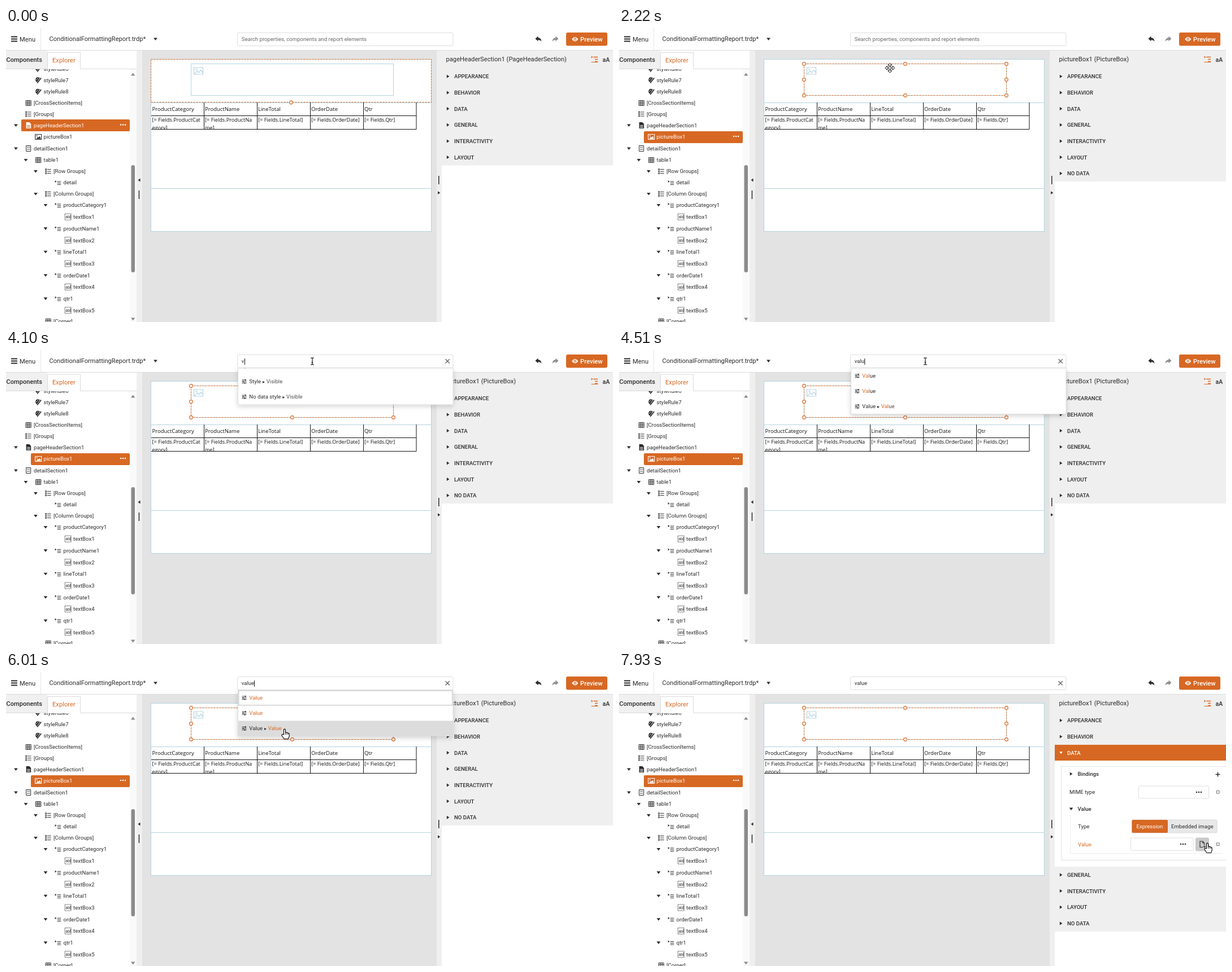
An HTML page for the animation above (8000 ms loop, 1074 by 521 pixels).

```html
<!DOCTYPE html>
<html lang="en">
<head>
<meta charset="utf-8">
<title>Report designer</title>
<style>
html, body { margin: 0; width: 100%; height: 100%; overflow: hidden; background: #fff; }
svg { display: block; width: 100%; height: 100%; font-family: Roboto, Arial, sans-serif; }
text { white-space: pre; }
.report { font-family: "Open Sans", "Noto Sans", sans-serif; }
.mark { font-family: "DejaVu Sans", sans-serif; font-size: 8px; }
</style>
</head>
<body>
<svg id="stage" viewBox="0 0 1074 521" xmlns="http://www.w3.org/2000/svg"></svg>
<script>
const LOOP = 8000;
const ORANGE = '#d76823', INK = '#2b2b2b', BLUE = '#b4d3e0', PANEL = '#efefef';
const stage = document.getElementById('stage');

// Drawing helpers; text is placed by its vertical centre.
const text = (x, y, s, o = {}) => {
  const size = o.size || 9.6;
  return `<text x="${x}" y="${y + size * 0.36}" font-size="${size}" font-weight="${o.weight || 400}"` +
    ` fill="${o.fill || INK}"${o.cls ? ` class="${o.cls}"` : ''}>${s}</text>`;
};
const rect = (x, y, w, h, fill, extra = '') =>
  `<rect x="${x}" y="${y}" width="${w}" height="${h}" fill="${fill}" ${extra}/>`;
const path = (d, fill = 'none', stroke = 'none', extra = '') =>
  `<path d="${d}" fill="${fill}" stroke="${stroke}" ${extra}/>`;
const at = (x, y, s) => `<g transform="translate(${x} ${y})">${s}</g>`;
const group = (id, s = '', extra = '') => `<g id="${id}" ${extra}>${s}</g>`;
const right = (x, y, r = 3, fill = INK) => at(x, y, path(`M${-r * .7} ${-r}L${r * .8} 0L${-r * .7} ${r}Z`, fill));
const down = (x, y, r = 3.4, fill = INK) => at(x, y, path(`M${-r} ${-r * .6}H${r}L0 ${r * .75}Z`, fill));
const dots = (x, y, fill = INK) => [-4, 0, 4].map(d => `<circle cx="${x + d}" cy="${y}" r="1.3" fill="${fill}"/>`).join('');

const C = 'currentColor';
const icons = {
  brush: path('M-5 -1Q-4 -6 0 -5L4 -4Q5 -2 2 -1L-1 3Q-5 4 -5 -1Z', C) +
    path('M-1 4L5 -5', 'none', '#fff', 'stroke-width="3"') + path('M-2 5L5 -4', 'none', C, 'stroke-width="1.8"') +
    '<circle cx="-3" cy="-1" r=".8" fill="#fff"/><circle cx="-1" cy="-3" r=".8" fill="#fff"/>',
  grid: path('M-4.5 -4.5H4.5V4.5H-4.5ZM-4.5 -1.5H4.5M-4.5 1.5H4.5M-1.5 -4.5V4.5M1.5 -4.5V4.5', 'none', C),
  groups: path('M-1.5 -3.5H5M-1.5 0H5M-1.5 3.5H5', 'none', C, 'stroke-width="1.1"') +
    path('M-5 -4.5H-3V-2.5H-5ZM-5 -.8H-3V.8H-5ZM-5 2.5H-3V4.5H-5Z', 'none', C, 'stroke-width=".9"'),
  page: path('M-4 -5.5H1.5L4.5 -2.5V5.5H-4Z', C) + path('M-2.5 0H3M-2.5 2H3M-2.5 4H3', 'none', 'var(--hole)', 'stroke-width=".9"'),
  section: path('M-4 -5H4V5H-4Z', 'none', C) + path('M-2 -2H3M-2 1.5H3', 'none', C, 'stroke-width="1.4" stroke-dasharray="1.4 1"'),
  picture: path('M-5.5 -4.5H5.5V4.5H-5.5Z', 'none', C, 'stroke-width="1.1"') + path('M-4 3.5L-1 0L.5 1.3L2.5 -1.5L4.5 3.5Z', C) +
    `<circle cx="-2.5" cy="-2" r="1" fill="${C}"/>`,
  detail: path('M-5.5 -4L-2.7 -2L-5.5 0Z', C) + path('M-1.5 -2H5M-1.5 .8H5M-1.5 3.5H5', 'none', C),
  box: path('M-5.5 -5.5H5.5V5.5H-5.5Z', 'none', C, 'stroke-dasharray="1.5 1.1"') +
    `<text x="-4.4" y="2.6" font-size="7" fill="${C}">ab</text>` + path('M4.2 -3.5V3.5', 'none', C),
  sliders: path('M-4 -2.7H4M-4 0H4M-4 2.7H4', 'none', C, 'stroke-width=".8"') +
    path('M2 -3.8V-1.6M-2 -1.1V1.1M1 1.6V3.8', 'none', C, 'stroke-width="1.1"')
};

// Explorer rows: label, level, icon, centre, expandable.
const tree = [
  ['styleRule6', 1, 'brush', 72.5], ['styleRule7', 1, 'brush', 92.5], ['styleRule8', 1, 'brush', 113],
  ['[CrossSectionItems]', 0, 'grid', 133], ['[Groups]', 0, 'groups', 152.5],
  ['pageHeaderSection1', 0, 'page', 172.5, 1], ['pictureBox1', 1, 'picture', 193],
  ['detailSection1', 0, 'section', 213.5, 1], ['table1', 1, 'grid', 234, 1],
  ['[Row Groups]', 2, 'groups', 254, 1], ['detail', 3, 'detail', 274], ['[Column Groups]', 2, 'groups', 294, 1]
];
['productCategory', 'productName', 'lineTotal', 'orderDate', 'qtr'].forEach((name, i) => {
  const y = 314 + i * 41.4;
  tree.push([name + '1', 3, 'detail', y, 1], ['textBox' + (i + 1), 4, 'box', y + 20.7]);
});
tree.push(['[Corner]', 2, 'grid', 520]);

const drawTree = (selected, hovered) => tree.map(([label, level, icon, y, open]) => {
  const indent = level * 17.5, x = 49 + indent, on = label === selected;
  const fill = on ? ORANGE : label === hovered ? '#ededed' : '';
  const left = Math.floor(27 + indent);
  return (fill ? rect(left, Math.round(y - 10.2), 219 - left, 21, fill, 'rx="2"') : '') +
    (open ? down(x - 31.5, y) : '') +
    `<g color="${on ? '#fff' : INK}" style="--hole:${on ? ORANGE : '#fff'}">${at(x - 9.3, y, icons[icon])}</g>` +
    text(x, y, label, { fill: on ? '#fff' : INK }) + (on ? dots(207, y - 1, '#fff') : '');
}).join('');

const header = () =>
  rect(0, 0, 1074, 40, '#fff') + rect(0, 39, 1074, 1, '#dcdcdc') +
  path('M9 15.5H20M9 19.5H20M9 23.5H20', 'none', INK, 'stroke-width="1.8"') +
  text(24, 19.5, 'Menu', { size: 11.2 }) + rect(61, 0, 1, 39, '#e6e6e6') +
  text(76.5, 19.5, 'ConditionalFormattingReport.trdp*', { size: 11.1 }) + down(264.5, 19.5) +
  [[942, 1, INK], [972, -1, '#8e8e8e']].map(([x, s, fill]) => `<g transform="translate(${x} 19.5) scale(${s} 1)">` +
    path('M-5.5 -.5L-.5 -5V-2.3Q5 -2 5.5 4.5Q3.5 1.4 -.5 1.4V4Z', fill) + '</g>').join('') +
  rect(991, 8, 73, 23.5, ORANGE, 'rx="3"') +
  at(1006.8, 19.7, path('M-5.5 0Q0 -7.5 5.5 0Q0 7.5 -5.5 0Z', '#fff') +
    `<circle r="2.4" fill="${ORANGE}"/><circle r="1.2" fill="#fff"/>`) +
  text(1016, 19.5, 'Preview', { size: 11.2, weight: 500, fill: '#fff' });

const leftPane = () =>
  rect(0, 40, 231, 481, '#fff') + rect(0, 40, 73, 32, '#f0f0f0') +
  text(.5, 56.5, 'Components', { size: 11.1, weight: 500 }) +
  path('M0 72.5H73.5V43.5H131.5V72.5H231', 'none', '#dadada') +
  text(82, 56.5, 'Explorer', { size: 11.2, fill: ORANGE }) +
  group('tree', '', 'clip-path="url(#treeClip)"') +
  rect(219, 73, 12, 448, '#fafafa') + rect(221.5, 243, 6.5, 190, '#8b8b8b', 'rx="3.2"') +
  path('M221 84.5L224.7 79.5L228.4 84.5Z', '#8b8b8b') + path('M221 513.5L224.7 518.5L228.4 513.5Z', '#8b8b8b');

function report() {
  const cols = [257, 350.5, 444.5, 538.5, 632.5];
  const names = ['ProductCategory', 'ProductName', 'LineTotal', 'OrderDate', 'Qtr'];
  const fields = [['ProductCat', 'egory]'], ['ProductNa', 'me]'], ['LineTotal]'], ['OrderDate]'], ['Qtr]']];
  const head = { size: 9.5, fill: '#111', cls: 'report' }, cell = { ...head, size: 9.2 };
  return rect(231, 40, 540, 481, PANEL) + rect(241, 40, 521, 481, '#e3e3e3') +
    path('M237.5 266.5L233.5 269.5L237.5 272.5Z', INK) + rect(234.7, 288, 1.5, 15, INK) +
    rect(765, 262, 1.5, 15, INK) + right(766, 292, 2.8) +
    rect(256.5, 55.5, 496, 305, '#fff', `stroke="${BLUE}"`) +
    path('M256 132.5H752M256 284.5H752', 'none', BLUE) +
    rect(327.5, 63.5, 358, 56, 'none', `stroke="${BLUE}"`) +
    at(340.5, 76, path('M-8 -6H8V6H-8Z', 'none', BLUE, 'stroke-width="1.2" stroke-linejoin="round"') +
      path('M-7 5.5L-2 0L1 3L4 -1.5L8 3', 'none', BLUE, 'stroke-width="1.2"') +
      `<circle cx="-3.6" cy="-2.6" r="1.3" fill="none" stroke="${BLUE}"/>`) +
    path('M257 179.5H726M257 155.5H726M726 132V179.5' + cols.slice(1).map(x => `M${x} 132V179`).join(''), 'none', '#111') +
    '<g clip-path="url(#cellClip)">' + cols.map((x, i) =>
      text(x + 1.5, 143.5, names[i], head) + text(x + 1.5, 162.5, '[= Fields.' + fields[i][0], cell) +
      (fields[i][1] ? text(x + 1.5, 176.5, fields[i][1], cell) : '')).join('') + '</g>' + group('pick');
}

const handle = (x, y) => `<circle cx="${x}" cy="${y}" r="2.9" fill="#fff" stroke="${ORANGE}" stroke-width="1.1"/>`;
const dashed = (x, y, w, h) => rect(x, y, w, h, 'none', `stroke="${ORANGE}" stroke-dasharray="3 2"`);
const drawPick = picture => {
  if (!picture) return dashed(256.5, 55.5, 496, 76) + handle(504.5, 132);
  let s = dashed(327.5, 63.5, 358, 56);
  for (const x of [327.5, 506.5, 685.5]) for (const y of [63.5, 91.5, 119.5])
    if (x !== 506.5 || y !== 91.5) s += handle(x, y);
  return s;
};

const dataForm = () => {
  const edge = 'stroke="#dedede" rx="2"';
  const mark = y => rect(1057.5, y - 2.5, 4.5, 4.5, '#fff', 'stroke="#666" stroke-width=".9"');
  return rect(771, 157, 303, 188, '#fff') + path('M1074 167.5H782.5V333.5H1074', 'none', '#e2e2e2') +
    right(800, 180.5) + text(811.5, 181, 'Bindings', { weight: 500 }) +
    path('M1055.5 181.5H1063.5M1059.5 177.5V185.5', 'none', INK, 'stroke-width="1.5"') +
    text(797, 213, 'MIME type') + rect(919.5, 202, 124, 22, '#fff', edge) + dots(1026, 213) + mark(213) +
    down(800, 242.5) + text(811.5, 243, 'Value', { weight: 500 }) +
    path('M798.5 253V321.5H1068', 'none', '#ececec') +
    text(812, 273.5, 'Type') + rect(907.5, 262, 150.5, 23, '#e8e8e8', 'stroke="#dadada" rx="2"') +
    rect(907.5, 262, 63.5, 23, ORANGE, 'rx="2"') +
    text(915.5, 273.5, 'Expression', { fill: '#fff' }) + text(977, 273.5, 'Embedded image') +
    text(812, 305.5, 'Value', { fill: ORANGE }) + rect(905.5, 294, 110.5, 22.5, '#fff', edge) + dots(998, 305) +
    rect(1020.5, 294, 23, 23, '#ebebeb', 'id="pickButton" stroke="#c9c9c9" rx="2"') +
    at(1032, 305.5, path('M3.5 1V-2.5L.7 -5.5H-4V5H1', 'none', INK, 'stroke-width="1.1"') +
      path('M.7 -5.5V-2.5H3.5', 'none', INK) + path('M1.5 4H6M3.8 1.8V6.2', 'none', INK)) + mark(305.5) +
    group('valueCaret', rect(912, 300, 1, 11.5, '#111'));
};

function drawPanel(picture, open) {
  const names = ['APPEARANCE', 'BEHAVIOR', 'DATA', 'GENERAL', 'INTERACTIVITY', 'LAYOUT'];
  if (picture) names.push('NO DATA');
  const bottom = 71.5 + names.length * 28.65 + (open ? 188 : 0);
  return rect(771, 40, 303, 481, '#fff') + rect(771, 40, 303, bottom - 40, PANEL) +
    text(778.5, 55, picture ? 'pictureBox1 (PictureBox)' : 'pageHeaderSection1 (PageHeaderSection)', { size: 11.2 }) +
    path('M1039.5 51.5H1047M1042 55.5H1047M1042 59.5H1047', 'none', ORANGE, 'stroke-width="1.3"') +
    right(1037, 51.5, 2, ORANGE) + path('M1035.5 60.5H1047', 'none', ORANGE) +
    text(1055.5, 56, 'aA', { size: 10.5, weight: 500 }) +
    names.map((name, i) => {
      const y = 85.8 + i * 28.65 + (open && i > 2 ? 187.7 : 0), on = open && i === 2;
      return (on ? rect(771, 129, 303, 28, ORANGE) : '') + (on ? down : right)(782, y, 3, on ? '#fff' : INK) +
        text(793, y, name, { weight: 500, fill: on ? '#fff' : INK });
    }).join('') + (open ? dataForm() : '');
}

// Suggestions: parts before and after the small arrow.
const broad = ['Value', 'Visible', 'Value', 'Value|Value', 'Bookmark|Value', 'Style|Vertical align',
  'Action|Value', 'Style|Visible', 'No data style|Visible'];
const narrow = ['Value', 'Value', 'Value|Value'];

function drawList(items, marked, focus, hover) {
  return items.map((item, i) => {
    const y = 45.8 + i * 27.1, [a, b] = item.split('|');
    const hit = s => `<tspan fill="${ORANGE}">${s.slice(0, marked)}</tspan>${s.slice(marked)}`;
    const arrow = `<tspan dx="2.8" class="mark">▸</tspan><tspan dx="2.8" fill="#4f4f4f">`;
    return (i === hover ? rect(411, y - 13.5, 380, 27, '#dcdcdc') : '') +
      (focus && !i ? rect(411.7, 33.2, 378, 25.6, 'none', 'stroke="#d4d4d4" stroke-width="1.6"') : '') +
      at(421.5, y, icons.sliders) + text(430.3, y, b ? a + arrow + hit(b) + '</tspan>' : hit(a));
  }).join('');
}

const cursors = {
  arrow: path('M0 0V13.6L3.1 10.8L5.4 16.2L7.7 15.2L5.4 10H9.6Z', '#fff', '#000', 'stroke-width="1"'),
  hand: path('M-1.5 10V1.3Q0 -1 1.5 1.3V6.2Q3 5.2 4 6.8Q5.5 6 6.3 7.5Q8 7.2 8.2 9V13L6.5 17.5H-1L-5 11.5Q-5 9 -3 9.5Z',
    '#fff', '#000', 'stroke-width="1.1" stroke-linejoin="round"') + path('M1.5 6V10M4 7V10M6.3 7.7V10', 'none', '#000', 'stroke-width=".8"'),
  beam: path('M-3 -6H-1L0 -5L1 -6H3M0 -5V5M-3 6H-1L0 5L1 6H3M-1.5 2H1.5', 'none', '#000', 'stroke-width="1.1"'),
  move: path('M0 -8.5L3.5 -5H1.2V-1.2H5V-3.5L8.5 0L5 3.5V1.2H1.2V5H3.5L0 8.5L-3.5 5H-1.2V1.2H-5V3.5L-8.5 0L-5 -3.5V-1.2H-1.2V-5H-3.5Z',
    '#fff', '#000', 'stroke-width="1"')
};

stage.innerHTML = `<defs>
  <clipPath id="treeClip">${rect(0, 73, 219, 448, '#000')}</clipPath>
  <clipPath id="cellClip">${rect(257, 132, 469, 47, '#000')}</clipPath>
  <clipPath id="listClip">${rect(410, 32, 381, 63, '#000', 'id="listMask"')}</clipPath>
  <filter id="shadow" x="-10%" y="-20%" width="120%" height="150%">
    <feDropShadow dx="0" dy="3" stdDeviation="4" flood-opacity=".17"/></filter></defs>` +
  report() + leftPane() + group('panel') + header() +
  group('popup', rect(410.5, 32, 380.5, 63, '#fff', 'id="listBack" stroke="#dedede" filter="url(#shadow)"') +
    '<g clip-path="url(#listClip)">' + group('list') + '</g>') +
  rect(409.5, 8.5, 381.5, 23, '#fff', 'stroke="#dedede" rx="2"') + group('query') +
  group('caret', rect(0, 15, 1, 11, '#111')) +
  group('clear', path('M777.5 16.2L784.8 23.5M784.8 16.2L777.5 23.5', 'none', '#666', 'stroke-width="1.4"')) + group('cursor');

const el = {};
stage.querySelectorAll('[id]').forEach(n => el[n.id] = n);
const show = (node, on) => node.setAttribute('visibility', on ? 'visible' : 'hidden');
const cache = {};
function fill(id, key, draw) {
  if (cache[id] === key) return;
  cache[id] = key;
  el[id].innerHTML = draw();
}

// Pointer stops; each easing shapes the way to that stop.
const easeIn = u => u * u, easeOut = u => 1 - (1 - u) * (1 - u), line = u => u;
const smooth = u => u * u * (3 - 2 * u);
const stops = [
  [310, 811, 446], [1080, 70, 172, smooth], [1210, 75, 185, line], [1450, 75, 185, line],
  [2150, 434, 96, easeIn], [2220, 479, 71, line], [2630, 542, 20, easeOut], [5380, 542, 20, line],
  [6010, 493, 101, smooth], [6080, 442, 98, smooth], [6150, 442, 98, line],
  [6420, 671, 150, easeIn], [6980, 1041, 303, easeOut]
];
function pointer(t) {
  const i = stops.findIndex(s => s[0] > t);
  if (i < 1) return stops[i ? stops.length - 1 : 0].slice(1, 3);
  const a = stops[i - 1], b = stops[i], u = b[3]((t - a[0]) / (b[0] - a[0]));
  return [a[1] + (b[1] - a[1]) * u, a[2] + (b[2] - a[2]) * u];
}

const inside = (x, y, l, t, r, b) => x >= l && x <= r && y >= t && y <= b;
function cursorKind(x, y, popup, picture, open) {
  if (popup && inside(x, y, 410, 32, 791, 113)) return 'hand';
  if (inside(x, y, 410, 8, 791, 32)) return 'beam';
  if (inside(x, y, 27, 73, 218, 521)) return 'hand';
  if (picture && !open && inside(x, y, 328, 62, 686, 119)) return 'move';
  if (open && inside(x, y, 1020, 294, 1043, 317)) return 'hand';
  return 'arrow';
}

// Typing steps: time, text, caret position.
const typing = [[3830, 'v', 422], [4240, 'va', 427], [4310, 'val', 429.5], [4510, 'valu', 434.3], [4650, 'value', 439]];
const blink = dt => Math.floor(dt / 530) % 2 === 0;

function render(t) {
  const picture = t >= 1410, open = t >= 6080, popup = t >= 4100 && !open;
  const [x, y] = pointer(t);

  const hovered = t >= 1150 && !picture ? 'pictureBox1' : '';
  fill('tree', picture + hovered, () => drawTree(picture ? 'pictureBox1' : 'pageHeaderSection1', hovered));
  fill('pick', picture, () => drawPick(picture));
  fill('panel', `${picture}${open}`, () => drawPanel(picture, open));

  const typed = typing.filter(k => k[0] <= t).pop();
  fill('query', typed ? typed[1] : '', () => typed ? text(416.7, 20, typed[1]) :
    text(416.7, 20, 'Search properties, components and report elements', { fill: '#666' }));
  const [since, , caretX] = typed || [2900, '', 417];
  el.caret.setAttribute('transform', `translate(${caretX} 0)`);
  show(el.caret, t >= 2900 && !open && blink(t - since));
  show(el.clear, t >= 4100);

  show(el.popup, popup);
  if (popup) {
    const few = t >= 4510, focus = t >= 4910;
    const full = few ? 81.5 : 244.5;
    const h = few ? full : full * (0.258 + 0.742 * easeOut(Math.min(1, (t - 4100) / 210)));
    const hover = few && y > 32 ? Math.floor((y - 32.3) / 27.1) : -1;
    el.listBack.setAttribute('height', h);
    el.listMask.setAttribute('height', h);
    el.list.setAttribute('transform', `translate(0 ${h - full})`);
    fill('list', `${few}${focus}${hover}`, () => drawList(few ? narrow : broad, few ? focus ? 5 : 3 : 0, focus, hover));
  }

  if (open) {
    const button = stage.querySelector('#pickButton'), caret = stage.querySelector('#valueCaret');
    button.setAttribute('fill', inside(x, y, 1020, 294, 1043, 317) ? '#cacaca' : '#ebebeb');
    show(caret, t >= 6150 && blink(t - 6150));
  }

  const kind = cursorKind(x, y, popup, picture, open);
  fill('cursor', kind, () => cursors[kind]);
  el.cursor.setAttribute('transform', `translate(${x} ${y})`);
  show(el.cursor, t >= 310);
}

function tick() {
  render(performance.now() % LOOP);
  requestAnimationFrame(tick);
}
tick();
</script>
</body>
</html>
```
